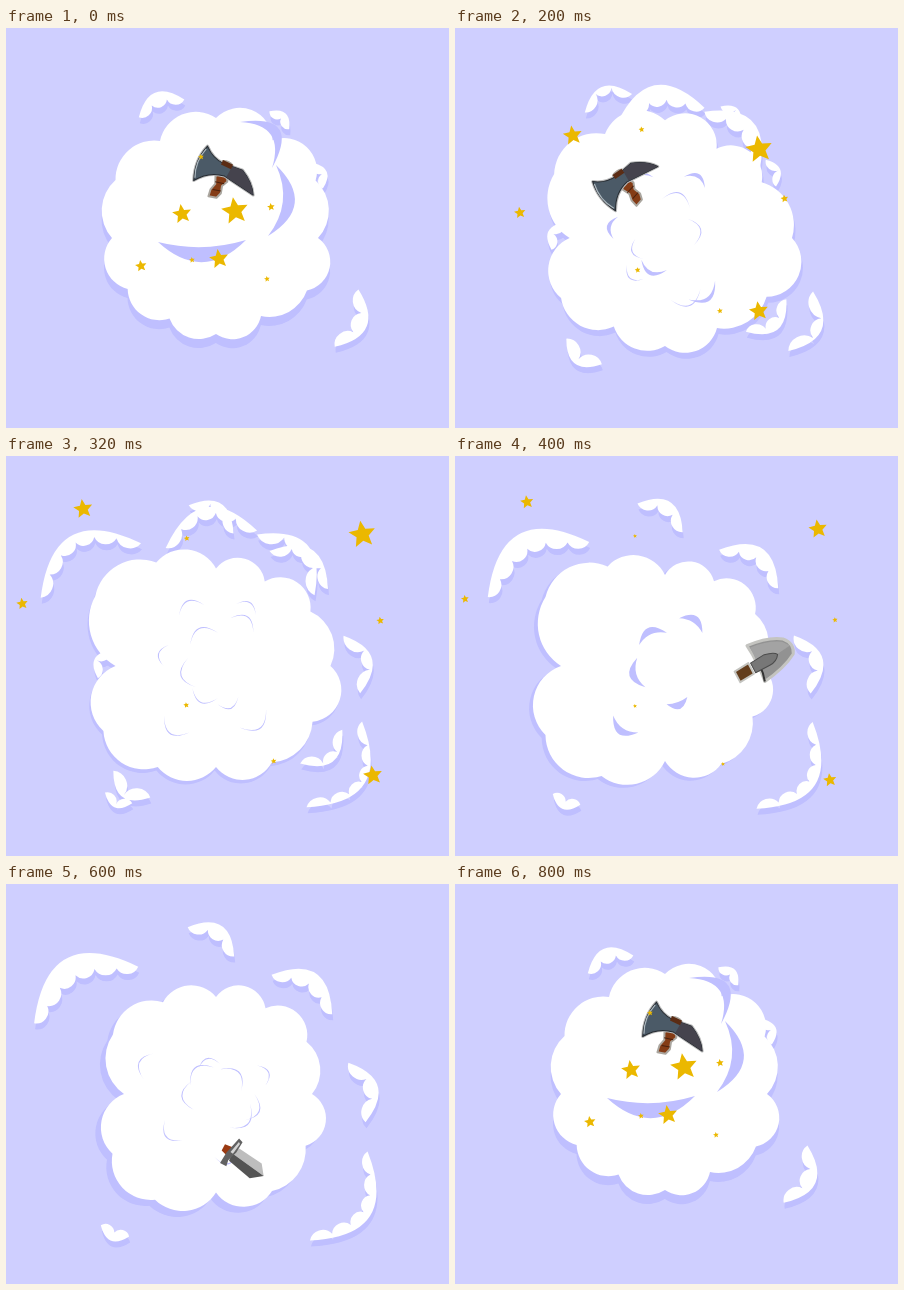
An HTML page that plays this animation: 443x400 px, repeating every 0.84 s.

```html
<!DOCTYPE html>
<html lang="en">
<head>
<meta charset="utf-8">
<title>Cartoon brawl</title>
<style>
html, body { margin: 0; width: 100%; height: 100%; overflow: hidden; background: #cfcfff; }
svg { display: block; width: 100%; height: 100%; }
</style>
</head>
<body>
<svg viewBox="0 0 443 400" preserveAspectRatio="none">
  <rect width="443" height="400" fill="#cfcfff"/>
  <path id="wispShade" fill="#bfbfff"/>
  <path id="cloudShade" fill="#bfbfff"/>
  <path id="cloud" fill="#fff"/>
  <path id="curls" fill="#bfbfff"/>
  <path id="wisps" fill="#fff"/>
  <g id="axe" stroke-linejoin="round">
    <path d="M-6-5Q0-8 5-5L4 6 7 12 4 18 6 25 4 31-4 33-5 26-3 19-6 12-4 6Z" fill="#843c16" stroke="#aaa69f" stroke-width="2"/>
    <path d="M-4 10l9-2M-4 17l9-2M-3 25l8-2" stroke="#4b210e"/>
    <path d="M-26-12Q-16-3-4-3L16-5Q30 2 36 13L2 8Q-14 10-24 25Q-32 6-26-12Z" fill="#485560" stroke="#b9b9b9" stroke-width="3"/>
    <path d="M-26-12Q-16-3-4-3L16-5Q30 2 36 13L2 8Q-14 10-24 25Q-32 6-26-12Z" fill="#4b5a67" stroke="#252a30"/>
    <path d="M5-4L16-5Q30 2 36 13L4 8Z" fill="#45434d"/>
    <path d="M-6-6h11v5h-11Z" fill="#5b2c14"/>
    <path d="M-26-9Q-31 7-24 22" fill="none" stroke="#adb8bf" stroke-width="1.2"/>
  </g>
  <g id="shovel" stroke-linejoin="round">
    <path d="M-15-23Q8-21 20-12Q28-3 22 6Q8 14-16 17Q-13-3-15-23Z" fill="#929292" stroke="#c4c4c0" stroke-width="3"/>
    <path d="M-13-20Q6-18 18-10L23-3 4-1-14 0Z" fill="#a3a3a3"/>
    <path d="M-16 17Q-13 8-13 0" fill="none" stroke="#333" stroke-width="2"/>
    <path d="M-20-6L-4-7Q6-5 8-1Q4 5-4 5L-20 5Z" fill="#777" stroke="#4c4c4c"/>
    <path id="grip" d="M-38-6L-22-7-22 5-38 6Z" fill="#633d1c" stroke="#c4c4c0" stroke-width="2"/>
  </g>
  <g id="stub">
    <path d="M-4-15Q0-18 4-15L2 0 5 14-3 15-1 0Z" fill="#7a4018" stroke="#d8d4cc" stroke-width="2"/>
    <path d="M-1-2L1-2 4 14-2 14Z" fill="#e9e4dc"/>
  </g>
  <g id="sword">
    <path d="M-9-3L-1-5-1 5-8 4Z" fill="#9a3a12"/>
    <path d="M2 0L5-8 32-9 41 0Z" fill="#bdbdbd"/>
    <path d="M2 0L41 0 31 10 4 8Z" fill="#545454"/>
    <path d="M-1-16L4-15 5-3 3 8 5 14-2 15-3 3Z" fill="#626262"/>
    <path d="M1-13L3-12 3 0 0 0Z" fill="#d4d4d4"/>
  </g>
  <path id="lines" fill="#2a2a2e"/>
  <path id="stars" fill="#ebb800"/>
</svg>
<script>
const FRAME = 40, LOOP = 840, CYCLE = 800, TAU = Math.PI * 2;
const CX = 210, CY = 210;

const el = id => document.getElementById(id);
const set = (id, name, value) => el(id).setAttribute(name, value);
const clamp = n => Math.max(0, Math.min(1, n));
const smooth = n => (n = clamp(n), n * n * (3 - 2 * n));
const lerp = (a, b, p) => a + (b - a) * p;
const rand = n => { const v = Math.sin(n * 12.9898) * 43758.5453; return v - Math.floor(v); };
const at = (x, y) => x.toFixed(2) + ' ' + y.toFixed(2);
const polar = (a, r) => [CX + Math.cos(a) * r, CY + Math.sin(a) * r];
// Time that runs below zero ahead of the next round.
const early = (u, from) => from < 0 && u >= CYCLE + from ? u - CYCLE : u;

// Reach of the cloud at even angles, clockwise from the right.
const POSES = [
  { t: 0, reach: [102, 105, 90, 96, 93, 102, 104, 116, 112, 120, 113, 115] },
  { t: 120, reach: [113, 108, 92, 110, 95, 116, 92, 102, 112, 145, 115, 107] },
  { t: 240, reach: [134, 122, 110, 107, 106, 122, 97, 141, 124, 104, 97, 114] },
  { t: 400, reach: [95, 101, 113, 95, 127, 138, 104, 138, 115, 91, 98, 104] },
  { t: 520, reach: [92, 97, 114, 89, 124, 128, 97, 138, 109, 93, 96, 115] },
  { t: 680, reach: [100, 110, 110, 108, 120, 111, 87, 100, 103, 101, 102, 94] }
];

// Wisps by stage: both ends and the width.
const STAGES = [
  { from: -100, to: 210, wisps: [[132, 88, 178, 70, 14], [264, 82, 284, 100, 10], [308, 134, 318, 160, 8], [354, 262, 330, 320, 12]] },
  { from: 150, to: 330, wisps: [[161, 95, 250, 78, 24], [250, 82, 306, 141, 19], [333, 272, 292, 305, 10], [146, 338, 110, 312, 9], [95, 222, 108, 194, 9]] },
  { from: 290, to: 750, wisps: [[30, 140, 133, 84, 28], [182, 45, 228, 74, 13], [265, 92, 325, 131, 18], [341, 179, 358, 238, 10], [360, 267, 303, 355, 11], [124, 351, 96, 340, 13]] }
];

// Stars: first place, last place, radius.
const STARS = [
  [176, 186, 72, 46, 10], [229, 183, 363, 73, 14], [213, 231, 375, 324, 10],
  [265, 179, 380, 164, 4], [135, 238, 10, 143, 6], [261, 251, 268, 308, 3],
  [186, 232, 180, 250, 3], [195, 129, 180, 80, 3]
];

// Tools turn and slide between two poses of x, y and angle.
const TOOLS = {
  axe: { from: -80, to: 320, t: [0, 240], a: [220, 140, 25], b: [155, 158, -47], hop: 13 },
  shovel: { from: 320, to: 600, t: [400, 520], a: [316, 203, -28], b: [294, 213, -22], hop: 0 },
  stub: { from: 440, to: 600, t: [480, 520], a: [262, 225, -40], b: [248, 230, -18], hop: 0 },
  sword: { from: 440, to: 760, t: [520, 680], a: [219, 273, 58], b: [230, 263, 14], hop: 0 }
};

// Speed lines: outer and inner end.
const BURSTS = [
  { from: 80, to: 160, rays: [[112, 121, 195, 212], [318, 95, 221, 215], [97, 233, 176, 226], [309, 276, 224, 228], [126, 290, 172, 251]] },
  { from: 480, to: 560, rays: [[30, -5, 174, 208], [352, 98, 219, 214], [30, 271, 170, 226], [377, 288, 249, 246], [331, 372, 256, 288]] }
];

function arc(x1, y1, x2, y2, b) {
  const r = Math.hypot(x2 - x1, y2 - y1) * (b * b + .25) / (2 * b);
  return `A${r.toFixed(2)} ${r.toFixed(2)} 0 0 1 ${at(x2, y2)}`;
}

function puffs(reach) {
  const pts = reach.map((r, i) => polar(i / reach.length * TAU, r));
  return 'M' + at(...pts[0]) + pts.map((p, i) =>
    arc(...p, ...pts[(i + 1) % pts.length], .18 + .16 * rand(i + 1))).join('') + 'Z';
}

// A crescent whose inner edge may be scalloped.
function band([x1, y1, x2, y2, w], b = .35, k = 1) {
  if (w < .4) return '';
  const dx = x2 - x1, dy = y2 - y1, len = Math.hypot(dx, dy);
  const point = (s, h) => [x1 + dx * s + dy / len * h, y1 + dy * s - dx / len * h];
  let d = `M${at(x1, y1)}Q${at(...point(.5, 2 * b * len))} ${at(x2, y2)}`;
  if (k === 1) return d + `Q${at(...point(.5, 2 * (b * len - w)))} ${at(x1, y1)}Z`;
  let last = [x2, y2];
  for (let i = k - 1; i >= 0; i--) {
    const s = i / k, q = 4 * s * (1 - s);
    const next = point(s, b * len * q - w * .75 * Math.sqrt(q));
    d += arc(...last, ...next, .3);
    last = next;
  }
  return d + 'Z';
}

function star(x, y, r) {
  if (r < .3) return '';
  let d = '';
  for (let i = 0; i < 10; i++) {
    const a = i * TAU / 10 - .15, q = i % 2 ? r * .46 : r;
    d += (i ? 'L' : 'M') + at(x + q * Math.sin(a), y - q * Math.cos(a));
  }
  return d + 'Z';
}

function ray([x1, y1, x2, y2], grow) {
  const x = lerp(x2, x1, grow), y = lerp(y2, y1, grow);
  const mx = lerp(x, x2, .65), my = lerp(y, y2, .65);
  const nx = (y1 - y2) / 124, ny = (x2 - x1) / 124;
  return `M${at(x, y)}L${at(mx + nx, my + ny)}L${at(x2, y2)}L${at(mx - nx, my - ny)}Z`;
}

function drawCloud(u) {
  const i = POSES.findLastIndex(p => p.t <= u), a = POSES[i];
  const b = POSES[i + 1] || { ...POSES[0], t: CYCLE };
  const p = (u - a.t) / (b.t - a.t);
  const d = puffs(a.reach.map((r, n) => lerp(r, b.reach[n], p)));
  const sx = 4 * Math.cos((u - 140) / CYCLE * TAU) - 2, sy = 6 + 3 * Math.cos(u / CYCLE * TAU);
  set('cloud', 'd', d);
  set('cloudShade', 'd', d);
  set('cloudShade', 'transform', `translate(${at(sx, sy)})`);
}

// Small creases in every pose; the first has one big puff in front instead.
function drawCurls(u) {
  let d = '';
  POSES.forEach(({ t }, n) => {
    const gap = Math.abs(u - t), power = clamp(1 - Math.min(gap, CYCLE - gap) / 95);
    if (!n) {
      d += band([234, 94, 266, 140, 10 * power], .5) + band([270, 137, 262, 208, 12 * power], .32);
      d += band([240, 212, 152, 214, 15 * power], .24);
      return;
    }
    for (let i = 0; i < 5; i++) {
      const k = n * 10 + i, a = (i + rand(k)) / 5 * TAU, r = 25 + 50 * rand(k + 70);
      const half = (11 + 6 * rand(k + 140)) / r;
      d += band([...polar(a - half, r), ...polar(a + half, r), 7 * power], .4);
    }
  });
  set('curls', 'd', d);
}

function drawWisps(u) {
  let d = '';
  for (const { from, to, wisps } of STAGES) {
    const p = (early(u, from) - from) / (to - from);
    if (p <= 0 || p >= 1) continue;
    const size = Math.sin(p * Math.PI) ** .6, drift = .97 + .06 * p;
    for (const [x1, y1, x2, y2, w] of wisps) {
      const ends = [x1, y1, x2, y2].map((v, i) => lerp(i % 2 ? CY : CX, v, drift));
      const k = Math.max(2, Math.round(Math.hypot(x2 - x1, y2 - y1) / 19));
      d += band([...ends, w * size], .35, k);
    }
  }
  set('wisps', 'd', d);
  set('wispShade', 'd', d);
  set('wispShade', 'transform', 'translate(1 6)');
}

function drawTools(u) {
  for (const id in TOOLS) {
    const { from, to, t, a, b, hop } = TOOLS[id], v = early(u, from);
    const size = clamp(Math.min(v - from, to - v) / 70);
    el(id).style.display = size ? '' : 'none';
    const p = (v - t[0]) / (t[1] - t[0]);
    const [x, y, turn] = a.map((n, i) => lerp(n, b[i], p));
    const lift = hop * Math.sin(clamp(p) * Math.PI);
    set(id, 'transform', `translate(${at(x, y - lift)}) rotate(${turn}) scale(${size})`);
  }
  el('grip').style.display = u < TOOLS.stub.t[0] ? '' : 'none';
}

function drawLines(u) {
  let d = '';
  for (const { from, to, rays } of BURSTS) {
    if (u >= from && u <= to) d += rays.map(r => ray(r, u === from ? .6 : 1)).join('');
  }
  set('lines', 'd', d);
}

function drawStars(u) {
  const v = early(u, -80), p = smooth(v / 370);
  const size = clamp((v + 80) / 80) * clamp((490 - v) / 130);
  set('stars', 'd', STARS.map(([x1, y1, x2, y2, r]) =>
    star(lerp(x1, x2, p), lerp(y1, y2, p), r * size)).join(''));
}

function draw(ms) {
  const u = Math.floor(ms % LOOP / FRAME) * FRAME % CYCLE;
  for (const part of [drawCloud, drawCurls, drawWisps, drawTools, drawLines, drawStars]) part(u);
}

function tick() {
  draw(performance.now());
  requestAnimationFrame(tick);
}
tick();
</script>
</body>
</html>
```
